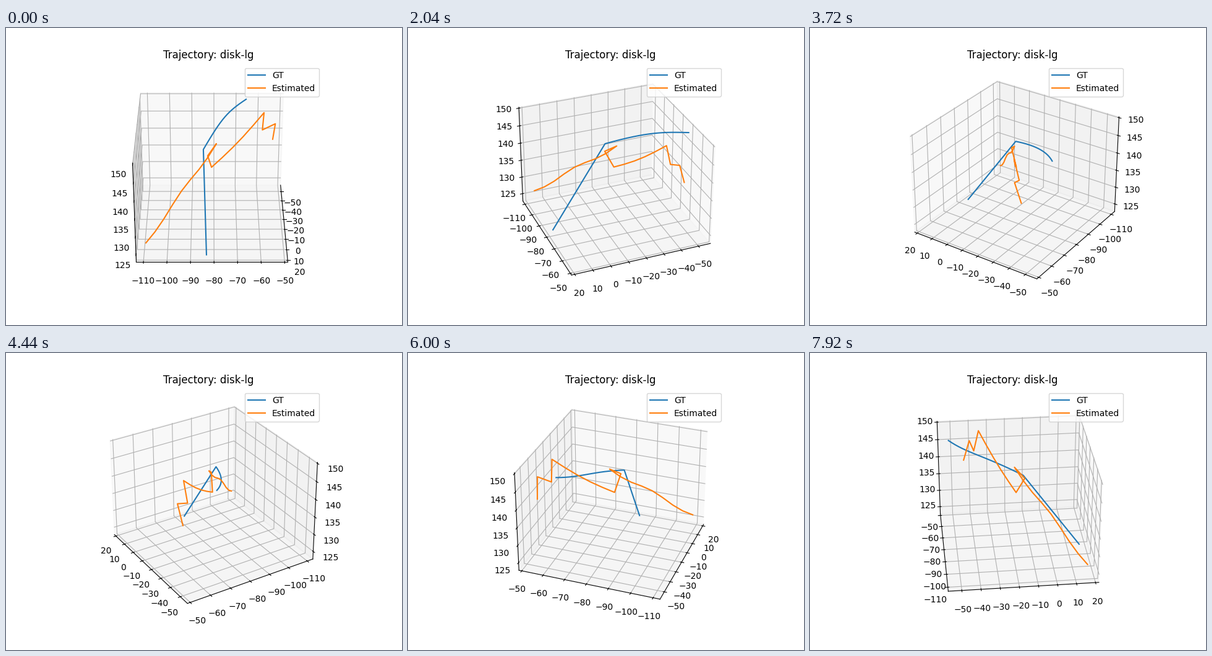
Write a matplotlib script that moves like this. It is 640x480 px and loops after 8000 ms.

```python
import numpy as np
import matplotlib.pyplot as plt
from matplotlib.animation import FuncAnimation

TICK = 40          # ms per animation frame
HOLD = 3           # frames each view stays
LOOP = 8000
TURN = 4           # degrees per view

LIMITS = np.array([(-57.05, 21.75), (-113.05, -48.65), (122.75, 150.28)])
CENTRE = LIMITS.mean(axis=1)
HALF = np.ptp(LIMITS, axis=1) / 2


def place(x, y, z):
    """Point given as -1..1 across the box."""
    return CENTRE + HALF * (x, y, z)


def leg(start, end, steps, sway, waves):
    """Even steps along a line whose height sways a little."""
    t = np.linspace(0, 1, steps + 1)[:, None]
    points = start + (end - start) * t
    points[:, 2] -= sway * np.sin(waves * np.pi * t[:, 0])
    return points


def bezier(a, b, c, d, steps):
    t = np.linspace(0, 1, steps + 1)[:, None]
    s = 1 - t
    return s**3 * a + 3 * s * s * t * b + 3 * s * t * t * c + t**3 * d


def true_path():
    bend = bezier(place(0.084, -0.116, 0.587), place(-0.442, 0.136, 0.862),
                  place(-0.640, 0.215, 0.851), place(-0.873, 0.474, 0.948), 16)
    return np.vstack([place(0.873, -0.074, -0.96), bend])


def estimated_path():
    first = leg(place(0.862, -0.873, -0.719), place(-0.015, 0.058, 0.632),
                8, 0.5, 3)
    second = leg(place(0, -0.007, 0.159), place(-0.447, 0.708, 0.96),
                 5, 0.68, 1)
    back = place(0.112, -0.058, 0.480)
    zigzag = [place(-0.517, 0.694, 0.557), place(-0.566, 0.873, 0.650),
              place(-0.652, 0.847, 0.265)]
    return np.vstack([first, back, second, zigzag])


fig = plt.figure(figsize=(6.4, 4.8), dpi=100)
ax = fig.add_subplot(projection="3d")
ax.plot(*true_path().T, label="GT")
ax.plot(*estimated_path().T, label="Estimated")
ax.set(xlim=LIMITS[0], ylim=LIMITS[1], zlim=LIMITS[2])
ax.set_title("Trajectory: disk-lg", x=0.4985)
ax.legend(loc="upper right")


def update(i):
    ax.view_init(elev=30, azim=TURN * (i // HOLD))
    return []


anim = FuncAnimation(fig, update, frames=LOOP // TICK, interval=TICK,
                     init_func=lambda: update(0), repeat=True, repeat_delay=0)
plt.show()
```
